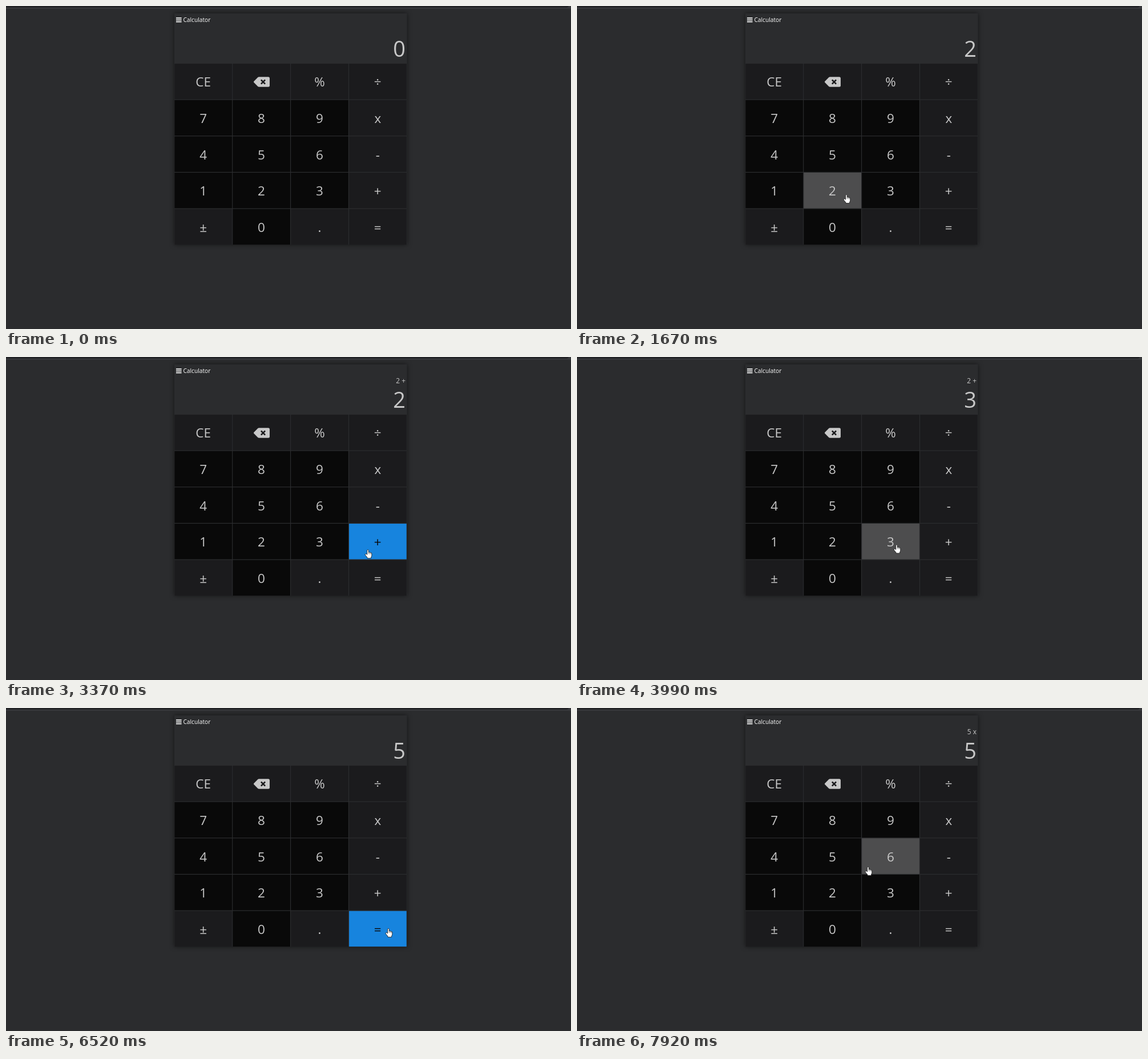
An HTML page for the animation above (7990 ms loop, 990x566 px).

```html
<!DOCTYPE html>
<html lang="en">
<head>
<meta charset="utf-8">
<title>Calculator</title>
<style>
  html, body { margin: 0; width: 100%; height: 100%; overflow: hidden; background: #2b2c2e; }
  svg { display: block; width: 990px; height: 566px; font-family: "Open Sans", "Noto Sans", sans-serif; fill: #c8c8c8; }
  .panel { fill: #2b2c2e; filter: drop-shadow(0 0 4px rgba(0, 0, 0, .55)); }
  .key { font-size: 22.5px; text-anchor: middle; }
  .key rect { fill: #1b1b1d; }
  .key.num rect { fill: #090909; }
  .key.hover rect { fill: #4d4d4e; }
  .key.op.hover rect { fill: #1784de; }
  .key.op.hover text { fill: #0a0a0a; }
  .out { text-anchor: end; }
  .cursor { fill: #fff; stroke: #111; stroke-width: .8; stroke-linejoin: round; }
</style>
</head>
<body>
<svg viewBox="0 0 990 566">
  <rect width="990" height="566" fill="#2b2c2e"/>
  <rect width="990" height="5" fill="#37383b"/>
  <path d="M0 0H986Q985 2.6 981 2.6H0Z" fill="#202124"/>
  <rect class="panel" x="295" y="13" width="407.5" height="405"/>
  <path d="M298 21.1H307.6M298 24.4H307.6M298 27.7H307.6" stroke="#fff" stroke-width="1.7"/>
  <text x="310.4" y="28" font-size="10.2" fill="#fff">Calculator</text>
  <text id="sum" class="out" x="700" y="46" font-size="12"></text>
  <text id="value" class="out" x="700" y="89.3" font-size="38">0</text>
  <g id="keys"></g>
  <circle id="press" r="9" fill="#ff0" fill-opacity=".47"/>
  <g id="cursor" class="cursor">
    <path id="arrow" d="M0 0V12.4L2.9 9.8 4.7 13.9 6.4 13.1 4.7 9.1H8.7Z"/>
    <g id="hand">
      <path d="M-1.3 1.2Q0 -.5 1.3 1.2V5Q2.5 4.2 3.3 5.2 4.6 4.7 5.2 5.9 6.6 5.6 6.8 7V10.4Q6.6 12.4 5.6 13.5V15.4H-1V14L-4.6 9.7Q-5.2 8 -3.8 7.6 -2.6 7.6 -1.3 9Z"/>
      <path d="M1.3 5V8M3.3 5.4V8.2M5.2 6V8.4" stroke-width=".5"/>
    </g>
  </g>
</svg>
<script>
const LOOP = 7990;
const LABELS = ["CE", "", "%", "÷", "7", "8", "9", "x", "4", "5", "6", "-", "1", "2", "3", "+", "±", "0", ".", "="];
const smooth = p => p * p * (3 - 2 * p);
const out = p => 1 - (1 - p) ** 2;

// pointer moves: start, end, steps, x, y, easing
const HOME = [892, 547];
const MOVES = [
  [70, 820, 11, 486, 348, smooth],
  [890, 1050, 3, 467, 330, smooth],
  [1670, 2370, 10, 645, 337, smooth],
  [3140, 3220, 2, 640, 338, smooth],
  [3370, 3760, 6, 560, 328.5, smooth],
  [4600, 5220, 9, 670, 386, smooth],
  [6600, 6920, 5, 650, 242, smooth],
  [7070, 7300, 4, 650, 210, out],
  [7760, 7920, 3, 510, 278, smooth]
];

// clicks: press, release, value, sum
const CLICKS = [
  [1200, 1290, "2", ""],
  [2680, 2760, "2", "2 +"],
  [3910, 3990, "3", "2 +"],
  [5600, 5680, "5", ""],
  [7450, 7530, "5", "5 x"]
];

const $ = id => document.getElementById(id);

function add(parent, tag, attrs) {
  const el = document.createElementNS("http://www.w3.org/2000/svg", tag);
  for (const name in attrs) el.setAttribute(name, attrs[name]);
  return parent.appendChild(el);
}

const keys = LABELS.map((label, i) => {
  const col = i % 4, row = i >> 2;
  const x = 295.4 + 101.9 * col, y = 101.1 + 63.65 * row;
  const kind = /\d/.test(label) ? "num" : col === 3 ? "op" : "";
  const el = add($("keys"), "g", { class: "key " + kind });
  add(el, "rect", { x, y, width: 100.7, height: 62.4 });
  if (label) {
    add(el, "text", { x: x + 50.2, y: y + 40.2 }).textContent = label;
  } else {
    add(el, "path", { d: "M434.4 134.1Q433.4 133 434.4 131.9L441 125.2Q442 124.3 443.4 124.3H459.5Q462 124.3 462 126.8V139.2Q462 141.7 459.5 141.7H443.4Q442 141.7 441 140.8Z" });
    add(el, "path", { d: "M446.9 129.4L454.1 136.6M454.1 129.4L446.9 136.6", stroke: "#1b1b1d", "stroke-width": 2.6 });
  }
  return { el, x, y };
});

function pointerAt(t) {
  let [x, y] = HOME;
  for (const [start, end, steps, toX, toY, ease] of MOVES) {
    if (t < start) break;
    const step = Math.floor((t - start + 5) / ((end - start) / (steps - 1)));
    const p = ease(Math.min(1, (step + 1) / steps));
    x += (toX - x) * p;
    y += (toY - y) * p;
  }
  return [x, y];
}

function render(t) {
  const [x, y] = pointerAt(t);
  const shown = t >= MOVES[0][0];
  let over = false;
  for (const key of keys) {
    const hit = shown && x >= key.x && x < key.x + 101.5 && y >= key.y && y < key.y + 63;
    key.el.classList.toggle("hover", hit);
    over = over || hit;
  }
  $("cursor").setAttribute("transform", `translate(${x} ${y})`);
  $("cursor").style.display = shown ? "" : "none";
  $("hand").style.display = over ? "" : "none";
  $("arrow").style.display = over ? "none" : "";

  let value = "0", sum = "", pressed = false;
  for (const [down, up, nextValue, nextSum] of CLICKS) {
    if (t >= up) [value, sum] = [nextValue, nextSum];
    else if (t >= down) pressed = true;
  }
  $("value").textContent = value;
  $("sum").textContent = sum;
  $("press").setAttribute("cx", x);
  $("press").setAttribute("cy", y);
  $("press").style.display = pressed ? "" : "none";
}

const begin = performance.now();
function tick() {
  render((performance.now() - begin) % LOOP);
  requestAnimationFrame(tick);
}
tick();
</script>
</body>
</html>
```
